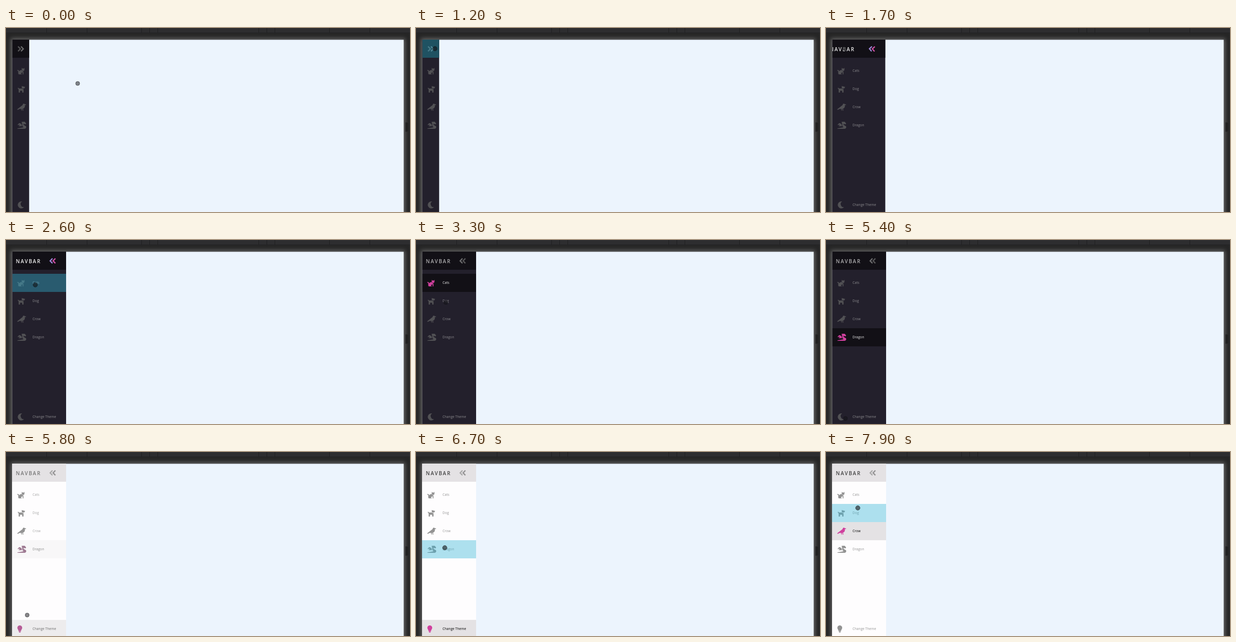
Animation of 800x365 px, one loop 8000 ms. Source, as an HTML page:

```html
<!DOCTYPE html>
<html lang="en">
<head>
<meta charset="utf-8">
<title>Animated navbar</title>
<style>
  html, body { margin: 0; width: 100%; height: 100%; overflow: hidden; background: #262626; }
  svg { display: block; width: 800px; height: 365px; }
  text { font: 6.7px "Open Sans", "Noto Sans", sans-serif; }
  #title { font-size: 10px; font-weight: 600; letter-spacing: 1.72px; }
  .icon { fill: #d0409e; }
  #chevron { fill: none; stroke-width: 2.4; }
  #glow { fill: #6a6a6a; filter: blur(4px); }
</style>
</head>
<body>
<svg viewBox="0 0 800 365">
  <defs><clipPath id="clip"><rect id="clipBox" y="23" height="342"/></clipPath></defs>
  <rect width="800" height="365" fill="#262626"/>
  <rect width="800" height="9" fill="#2d2d2f"/>
  <path d="M0 9.5H800" stroke="#222224"/>
  <path id="ticks" stroke="#1f1f20"/>
  <rect id="glow" x="10" y="21" width="780" height="360"/>
  <rect x="791" y="187" width="7" height="19" fill="#29292a"/>
  <path d="M792.5 188V205M795.5 188V205" stroke="#151515"/>
  <rect x="12" y="23.4" width="775.5" height="342" fill="#ecf4fd"/>
  <path d="M12.5 23V365" stroke="#56545c"/>
  <g clip-path="url(#clip)">
    <rect id="nav" x="12" y="23" width="110" height="342"/>
    <rect id="head" x="12" y="23" width="110" height="36"/>
    <g id="headLink">
      <text id="title" y="45.5">NAVBAR</text>
      <g id="chevron">
        <path d="M-5.3-4.8L-.7 0L-5.3 4.8" stroke="#d050a4"/>
        <path d="M.5-4.8L5.1 0L.5 4.8" stroke="#9a86d8"/>
      </g>
    </g>
    <g id="rows"></g>
    <rect id="flash" x="12" width="110" height="36" fill="rgb(51,181,212)" fill-opacity=".4"/>
  </g>
  <circle id="touch" fill="#121216" stroke="#121216" stroke-opacity=".5"/>
</svg>
<script>
const $ = id => document.getElementById(id);
const LOOP = 8000, SPEED = 600, OPEN = 1215, THEME = 5560;

const moon = "M13.2 11.4A7 7 0 1 1 9.5.1A6.1 6.1 0 0 0 13.2 11.4Z";
const bulb = "M2.6 11.4Q2 9.8 1.2 8A4.8 4.8 0 1 1 8.4 8Q7.5 9.8 7 11.4ZM2.6 12H7L6 14H3.6Z";
const entries = [
  ["Cats", "M0 5.2Q3.5 5 3.5 8Q5 5.2 8.3 5.2Q9 8 12 8.2V14H10.5V9.5L7 12L9 14H3.5Q1.8 14 1.8 12V8Q1.8 7 0 7ZM8.7.9L10.5 2.6H12.2L14 .9V4.6A2.6 2.6 0 0 1 8.7 4.6Z"],
  ["Dog", "M.9 5A.9.9 0 0 1 2.6 5Q2.7 6.1 3.5 6.1H8L12.2 7.6V14H9.6V10.5H5.2V14H2.6V7.7Q.9 7 .9 5ZM8.7 1L10.2 1.8H12L12.7 2.6H14.9V4Q14.9 5.7 13.1 5.7H12.2V6.6L8.7 5.4Z"],
  ["Crow", "M14.9.9H14.4A2.2 2.2 0 0 0 10.5 2.2V2.8L0 11V12Q.5 12.6 1.2 12.2L4.5 10.5H7.1L8.4 14L9.5 13.6L8.4 10.5H9.8L11 14L12.2 13.6L11 10Q14.9 8.6 14.9 5.3V3.1L17.5 2.6Q17.4 1 14.9.9Z"],
  ["Dragon", "M.2 6.6L5.2 6.1L2.5 8.3Q2.3 8.7 3 8.7H9L8.7 5.2L5 2.7Q4 2.5 3.3 3L.2 6.2ZM8 0H14.5L17.3 3.3L16.5 5.1H14.7L14 4.4H12.2V5.4Q12.2 6.2 13 6.6L15.7 7.9A3.2 3.2 0 0 1 14.1 14H.2V13L12.2 11Q9.6 9.2 9.6 6.5V3.5L8 2.5L9.6 1.8Z"],
  ["Change Theme", moon]
];
// Row 0 is the header, the last one sits at the bottom.
const rowY = i => i === 0 ? 23 : i === 5 ? 333 : 31 + 36 * i;

// Where the touch point stops; a stop with a row taps it, and the row stays hovered until the next tap.
const stop = (at, x, y, row) => ({ at, x, y, row });
const stops = [
  stop(0, 142, 110), stop(450, 75, 154), stop(OPEN, 37.5, 41, 0), stop(2050, 37.5, 41),
  stop(2650, 58, 89, 1), stop(3450, 59, 124, 2), stop(4190, 62, 172, 3), stop(4650, 60, 196, 4),
  stop(THEME, 38.5, 354, 5), stop(6790, 57, 190, 4), stop(7280, 60, 155, 3), stop(8010, 63, 111, 2)
];
const taps = stops.filter(s => s.row >= 0);

const set = (el, attrs) => { for (const a in attrs) el.setAttribute(a, attrs[a]); };
const mix = (a, b, k) => a + (b - a) * k;
const grey = v => `rgb(${v},${v},${v})`;

const ticks = [80, 160, 268, 284, 300].map(x => `M${x}.5 0V9M${800 - x}.5 0V9`);
set($("ticks"), { d: ticks.join("") });

$("rows").innerHTML = entries.map(([label, d], i) => {
  const y = rowY(i + 1);
  return `<g><rect x="12" y="${y}" width="110" height="36"/>
    <path class="icon" transform="translate(22.5 ${y + 11})" d="${d}"/>
    <text x="52.5" y="${y + 20.4}">${label}</text></g>`;
}).join("");
const rows = [...$("rows").children];
const themeIcon = rows[4].querySelector("path");

// CSS "ease": cubic-bezier(.25, .1, .25, 1)
function ease(x) {
  if (x <= 0) return 0;
  if (x >= 1) return 1;
  let lo = 0, hi = 1, u;
  for (let i = 0; i < 24; i++) {
    u = (lo + hi) / 2;
    if (.75 * u * (1 - u) + u ** 3 < x) lo = u; else hi = u;
  }
  return .3 * u * (1 - u) ** 2 + 3 * u * u * (1 - u) + u ** 3;
}
const since = (t, start) => ease((t - start) / SPEED);

function hover(row, t) {
  return Math.max(0, ...taps.map((tap, i) =>
    tap.row === row ? since(t, tap.at) - since(t, taps[i + 1]?.at ?? Infinity) : 0));
}

// Glides between stops and rests a moment before each tap.
function touchAt(t) {
  const i = stops.findIndex(s => s.at > t), a = stops[i - 1], b = stops[i];
  const rest = b.row >= 0 ? 200 : 0;
  const k = Math.min(1, (t - a.at) / (b.at - rest - a.at));
  const s = mix(k, k * k * (3 - 2 * k), .5);
  return { cx: mix(a.x, b.x, s), cy: mix(a.y, b.y, s) };
}

function linkStyle(el, k) {
  el.style.filter = `grayscale(${1 - k}) opacity(${.7 + .3 * k})`;
}

function draw(t) {
  const light = t >= THEME, fade = since(t, THEME), open = since(t, OPEN);
  const back = light ? "#e4e2e4" : "#121016";
  const left = light ? 12 : 12.8;
  set($("nav"), { fill: light ? "#fefdfe" : "#23202c" });
  set($("head"), { fill: back });
  set($("clipBox"), { x: left, width: mix(45.8, 119, open) - left });

  set($("title"), { x: 19.5 - 560 * (1 - open), fill: grey(mix(236, 0, fade)) });
  set($("chevron"), { transform: `translate(${mix(29.2, 92.5, open)} 41.4) rotate(${-180 * open})` });
  linkStyle($("headLink"), hover(0, t));

  rows.forEach((row, i) => {
    const k = hover(i + 1, t), [bg, , label] = row.children;
    linkStyle(row, k);
    set(bg, { fill: back, "fill-opacity": k });
    set(label, {
      fill: grey(mix(mix(182, 105, fade), mix(236, 0, fade), k)),
      visibility: t >= OPEN ? "visible" : "hidden"
    });
  });
  set(themeIcon, { d: light ? bulb : moon });

  const tap = taps.find(({ at }) => t >= at - 140 && t < at + 20);
  const flash = tap && t > 1150;
  set($("flash"), { y: tap ? rowY(tap.row) : 0, visibility: flash ? "visible" : "hidden" });
  set($("touch"), { ...touchAt(t), r: tap ? 4.4 : 4, "fill-opacity": tap ? .6 : .5 });
}

const start = performance.now();
function tick() {
  draw((performance.now() - start) % LOOP);
  requestAnimationFrame(tick);
}
tick();
</script>
</body>
</html>
```
